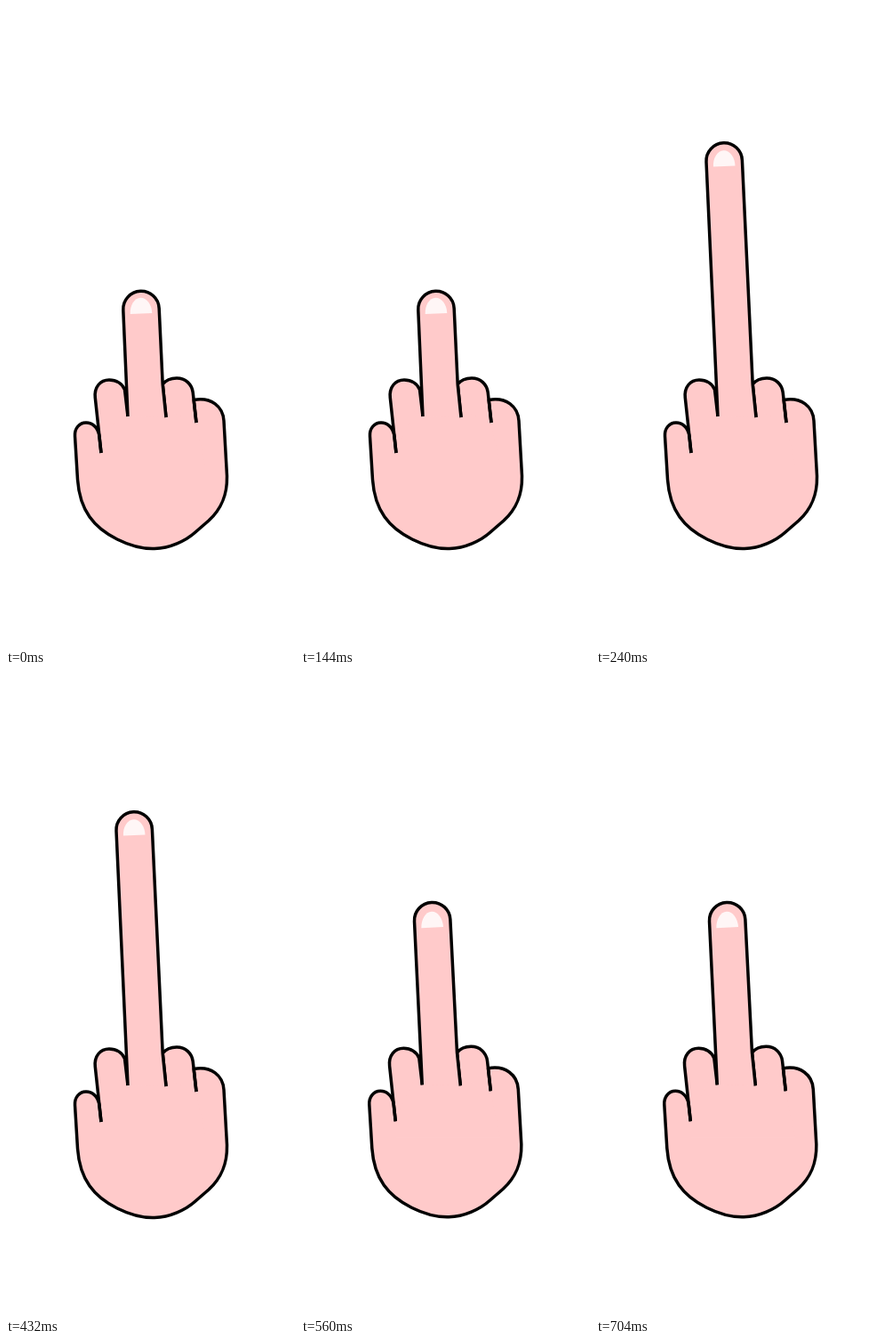
An HTML page with a canvas that plays this animation: 325x720 px, repeating every 800 ms.

```html
<!DOCTYPE html>
<html>
<head>
<meta charset="utf-8">
<style>
html, body { margin: 0; width: 100%; height: 100%; overflow: hidden; background: #fff; }
canvas { display: block; width: 325px; height: 720px; }
</style>
</head>
<body>
<canvas id="stage" width="325" height="720"></canvas>
<script>
const ctx = document.getElementById('stage').getContext('2d');
const SKIN = '#ffcaca';
const LOOP = 800;
// Fingertip centre, nail base below it, and a slight shift of the whole hand
const poses = [
  { until: 240, x: 152, y: 340.5, nail: 5, shift: 0 },
  { until: 560, x: 144.2, y: 174, nail: 6, shift: 0 },
  { until: 800, x: 148.4, y: 276.3, nail: 8, shift: -0.7 }
];

const palm = new Path2D(`
  M107 502 L104.8 482 C103 473 97 468 90 468 C82 468 77 475 77.5 483
  L80.5 532 C83 567 99 586 125 599 C139 606 152 610 167 609.5
  C184 609 202 601 213 591 L228 578 C242 565 249 550 248.5 528
  L245 466 C244 450 231 439 211.2 442.5 L214 468`);
const leftKnuckle = new Path2D(
  'M107 502 L100.3 440 C99 428 106 420 116 420 C124 420 131 424 133.5 431 L137 461');
const rightKnuckle = new Path2D(
  'M180 462 L176.2 425 C180 420 186 418 192 418 C202 418 209 425 210.2 434 L214 468');
const hand = [palm, leftKnuckle, rightKnuckle];
const join = new Path2D('M107 500 L128 455 L180 455 L213 465 L225 520 L107 520 Z');

function finger({ x, y, nail }) {
  const p = new Path2D();
  p.moveTo(137, 461);
  p.lineTo(x - 20.2, y + 1);
  p.arc(x, y, 20.2, Math.PI * 0.985, -Math.PI * 0.015);
  p.lineTo(176.2, 425);
  p.lineTo(180, 462);
  ctx.fill(p);
  ctx.stroke(p);

  ctx.save();
  ctx.translate(x, y + nail);
  ctx.rotate(-0.045);
  ctx.fillStyle = '#fff6f6';
  ctx.beginPath();
  ctx.ellipse(0, 0, 12.3, 17.8, 0, Math.PI, Math.PI * 2);
  ctx.fill();
  ctx.restore();
}

function draw(now) {
  const pose = poses.find(p => now % LOOP < p.until);
  ctx.fillStyle = '#fff';
  ctx.fillRect(0, 0, 325, 720);
  ctx.fillStyle = SKIN;
  ctx.strokeStyle = '#000';
  ctx.lineWidth = 3.5;
  ctx.lineJoin = 'round';

  ctx.save();
  ctx.translate(pose.shift, pose.shift);
  [...hand, join].forEach(p => ctx.fill(p));
  hand.forEach(p => ctx.stroke(p));
  finger(pose);
  ctx.restore();
}

const start = performance.now();
function tick() {
  draw(performance.now() - start);
  requestAnimationFrame(tick);
}
tick();
</script>
</body>
</html>
```
